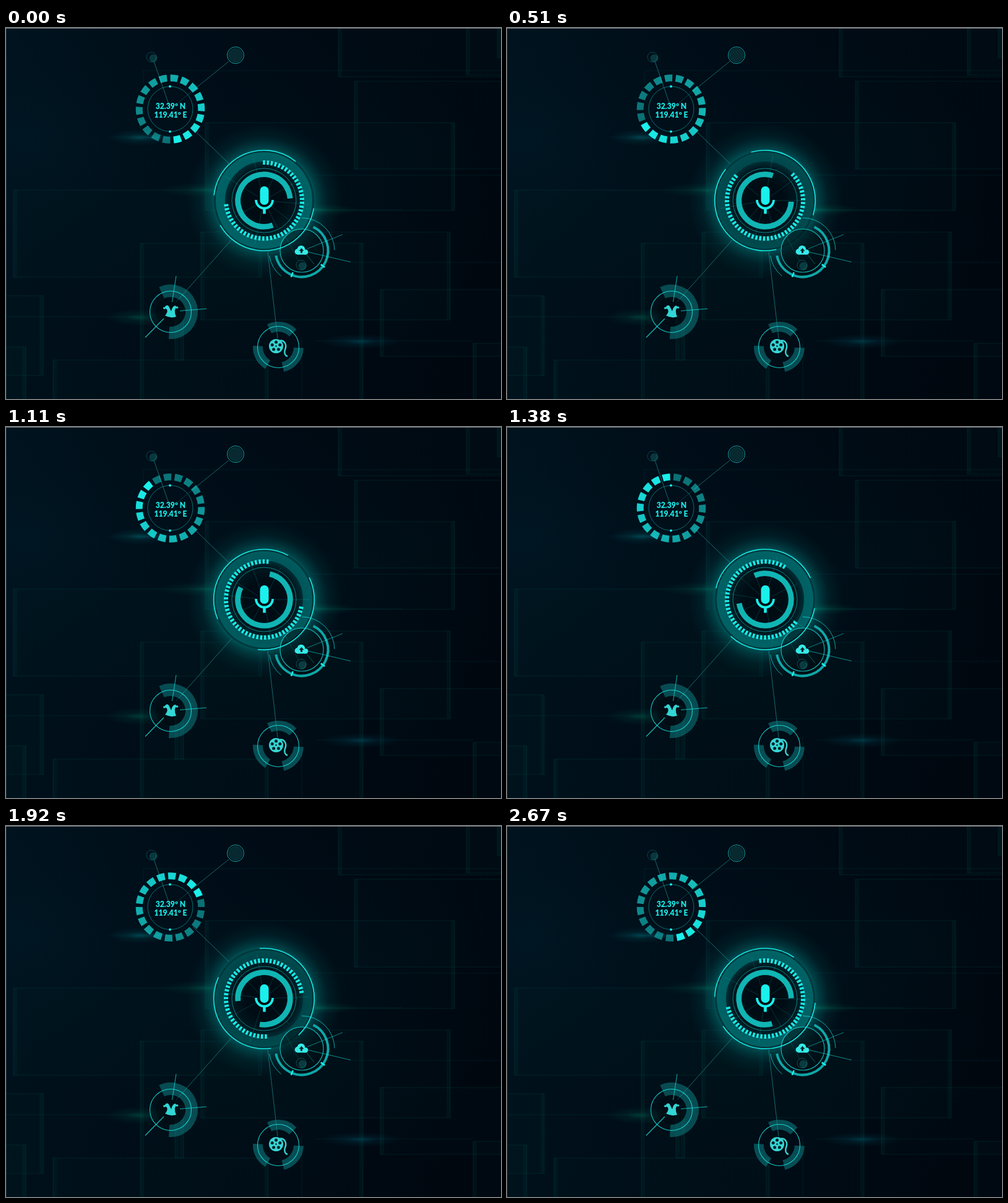
Animation of 800x600 px, one loop 2.7 s. Source, as an HTML page with a canvas:

```html
<!DOCTYPE html>
<html lang="en">
<head>
<meta charset="utf-8">
<title>Voice control HUD</title>
<style>
html, body { margin: 0; width: 100%; height: 100%; overflow: hidden; background: #000a13; }
canvas { display: block; width: 800px; height: 600px; }
</style>
</head>
<body>
<canvas id="stage" width="800" height="600"></canvas>
<script>
const LOOP = 2700, STEP = 30, TAU = Math.PI * 2;
const HUB = [417, 279], DIAL = [265.5, 131], CLOUD = [478, 360], HAT = [266, 459], REEL = [440, 516];
const stage = document.getElementById('stage').getContext('2d');
const backdrop = document.createElement('canvas');
backdrop.width = 800;
backdrop.height = 600;
let g = backdrop.getContext('2d');

const rad = deg => deg * Math.PI / 180;
const cyan = alpha => `rgba(26,240,236,${alpha})`;
const polar = ([x, y], r, deg) => [x + r * Math.cos(rad(deg)), y + r * Math.sin(rad(deg))];

function arc([x, y], r, from, to, width, color) {
  g.beginPath();
  g.arc(x, y, r, rad(from), rad(to));
  g.lineWidth = width;
  g.strokeStyle = color;
  g.stroke();
}

const ring = (center, r, width, color) => arc(center, r, 0, 360, width, color);

function disc([x, y], r, color) {
  g.beginPath();
  g.arc(x, y, r, 0, TAU);
  g.fillStyle = color;
  g.fill();
}

function line(x1, y1, x2, y2, color, width = 1) {
  g.beginPath();
  g.moveTo(x1, y1);
  g.lineTo(x2, y2);
  g.lineWidth = width;
  g.strokeStyle = color;
  g.stroke();
}

function spoke(center, r1, r2, deg, color, width) {
  line(...polar(center, r1, deg), ...polar(center, r2, deg), color, width);
}

function glow(x, y, rx, ry, rgb, alpha) {
  g.save();
  g.translate(x, y);
  g.scale(rx, ry);
  const fade = g.createRadialGradient(0, 0, 0, 0, 0, 1);
  fade.addColorStop(0, `rgba(${rgb},${alpha})`);
  fade.addColorStop(0.4, `rgba(${rgb},${alpha * 0.35})`);
  fade.addColorStop(1, `rgba(${rgb},0)`);
  g.fillStyle = fade;
  g.fillRect(-1, -1, 2, 2);
  g.restore();
}

function frame(x1, y1, x2, y2) {
  g.strokeStyle = 'rgba(0,105,100,.14)';
  g.lineWidth = 1.5;
  g.strokeRect(x1, y1, x2 - x1, y2 - y1);
  g.fillStyle = 'rgba(0,95,90,.1)';
  g.fillRect(x1, y1, 6, y2 - y1);
  g.fillRect(x2 - 6, y1, 6, y2 - y1);
  g.fillStyle = 'rgba(0,90,95,.025)';
  g.fillRect(x1, y1, x2 - x1, y2 - y1);
}

function drawBackdrop() {
  const base = g.createLinearGradient(0, 0, 800, 120);
  base.addColorStop(0, '#00121d');
  base.addColorStop(0.5, '#000b15');
  base.addColorStop(1, '#00070f');
  g.fillStyle = base;
  g.fillRect(0, 0, 800, 600);
  glow(40, 180, 330, 260, '0,34,50', 0.3);
  glow(430, 290, 380, 290, '0,40,52', 0.26);

  [[12, 262, 413, 403], [322, 153, 725, 295], [563, 86, 820, 228], [537, -9, 820, 79],
    [744, -9, 820, 76], [794, -9, 820, 48], [217, 348, 577, 620], [315, 330, 718, 472], [605, 423, 820, 531],
    [755, 510, 820, 620], [-9, 433, 60, 562], [-9, 516, 32, 620], [76, 537, 424, 620], [273, 452, 287, 537]
  ].forEach(box => frame(...box));
  [[222, 69, 800, 69], [222, 69, 222, 90], [495, 238, 800, 238], [560, 379, 800, 379],
    [0, 467, 215, 467], [500, 506, 755, 506], [500, 294, 640, 294], [478, 500, 478, 600]
  ].forEach(path => line(...path, 'rgba(0,110,110,.16)'));

  glow(215, 177, 48, 13, '0,100,105', 0.5);
  glow(235, 177, 80, 5, '0,95,115', 0.35);
  glow(322, 262, 75, 12, '0,105,85', 0.4);
  glow(215, 468, 55, 14, '0,110,85', 0.42);
  glow(573, 507, 65, 12, '0,85,105', 0.5);
  glow(500, 294, 70, 10, '0,125,90', 0.4);

  g.fillStyle = 'rgba(150,165,170,.75)';
  g.fillRect(0, 0, 800, 1);
  g.fillStyle = 'rgba(110,130,140,.25)';
  g.fillRect(0, 0, 1, 600);
}

function drawLinks() {
  const link = 'rgba(40,165,165,.58)';
  line(360, 54, 302, 101, link);
  line(302, 101, 277, 122, cyan(0.2));
  line(239, 54, 264, 126, link);
  line(302, 163, 360, 219, link);
  line(364, 343, 275, 443, link);
  line(423, 362, 439, 502, link);
  disc([371, 44], 11, '#07292f');
  ring([371, 44], 11, 0.6, cyan(0.25));
  ring([371, 44], 13.5, 1, cyan(0.65));
  disc([238, 49], 6.5, 'rgba(12,70,75,.75)');
  ring([235, 47], 8, 1, cyan(0.24));
}

function drawDial(turn) {
  for (let i = 0; i < 18; i++) {
    const mid = 77 + turn - i * 20;
    arc(DIAL, 50.3, mid - 6.9, mid + 6.9, 11, cyan(0.43 + 0.57 * Math.pow(1 - i / 17, 1.15)));
  }
  const [x, y] = DIAL;
  ring(DIAL, 36.5, 1, cyan(0.42));
  disc([x - 0.5, y - 36.5], 1.9, cyan(1));
  disc([x - 0.5, y + 36.5], 1.9, cyan(1));
  g.fillStyle = cyan(0.97);
  g.font = '900 12.2px Lato, sans-serif';
  g.textAlign = 'center';
  g.fillText('32.39° N', 266, 130.5);
  g.fillText('119.41° E', 266, 144.5);
}

function drawMic() {
  g.fillStyle = cyan(1);
  g.beginPath();
  g.roundRect(410.5, 256, 14, 30, 7);
  g.fill();
  arc([417.5, 278], 13.5, 0, 180, 3.8, cyan(1));
  g.fillRect(415.2, 291, 4.6, 9.5);
}

function drawHub(n) {
  const turn = n * 4;
  const pulse = 0.5 + 0.5 * Math.cos(n / 45 * TAU);
  const tickTurn = n < 65 ? n * 180 / 65 : 180 + (n - 65) * 7.2;

  const halo = g.createRadialGradient(...HUB, 76, ...HUB, 126);
  halo.addColorStop(0, 'rgba(0,150,148,.62)');
  halo.addColorStop(0.2, 'rgba(0,130,130,.4)');
  halo.addColorStop(0.55, 'rgba(0,105,108,.14)');
  halo.addColorStop(1, 'rgba(0,90,100,0)');
  disc(HUB, 126, halo);

  const body = g.createRadialGradient(...HUB, 30, ...HUB, 82);
  body.addColorStop(0, '#000c14');
  body.addColorStop(0.45, '#001820');
  body.addColorStop(0.65, '#003036');
  body.addColorStop(1, '#003a3e');
  disc(HUB, 81, body);
  ring(HUB, 70.5, 15, `rgba(0,155,155,${0.17 + 0.27 * pulse})`);

  disc(CLOUD, 35, 'rgba(0,14,21,.5)');
  [[5, 72], [38, 62], [64, 50], [102, 72], [150, 58], [212, 74], [256, 70], [292, 60], [330, 56]]
    .forEach(([deg, r]) => spoke(HUB, 12, r, deg + turn, cyan(0.16), 1));

  arc(HUB, 81.3, 186 + turn, 309 + turn, 1.6, cyan(0.95));
  arc(HUB, 81.3, 9 + turn, 150.6 + turn, 1.6, cyan(0.95));
  for (let i = 0; i < 46; i++) {
    spoke(HUB, 58, 65, -90 + tickTurn + i * 5.84, cyan(0.96), 3.6);
  }
  ring(HUB, 52, 1, cyan(0.5));
  arc(HUB, 42.3, 70.5 - turn, 355.5 - turn, 8.8, 'rgba(18,196,194,.92)');
  drawMic();
}

function drawCloud() {
  ring(CLOUD, 35, 1.1, cyan(0.75));
  arc(CLOUD, 42.5, -64, 169, 4, 'rgba(16,184,184,.9)');
  spoke(CLOUD, 38, 46, 36, cyan(1), 2.6);
  spoke(CLOUD, 38, 46, 112, cyan(1), 2.6);
  arc(CLOUD, 53, -90, -1, 1, cyan(0.65));
  arc(CLOUD, 53, 129, 171, 1, cyan(0.65));
  line(487, 357, 544, 334, cyan(0.5));
  line(487, 362, 557, 378.5, cyan(0.55));
  line(486, 367, 498, 382, cyan(0.35));
  line(452, 338, 473, 377, cyan(0.15));
  disc([479, 385], 6.5, 'rgba(12,70,75,.8)');
  ring([477, 383.5], 8, 1, cyan(0.28));

  const fill = '#35ebe8';
  disc([471.3, 361.8], 4.7, fill);
  disc([477, 358], 6.2, fill);
  disc([484, 362.4], 4.1, fill);
  g.fillRect(471, 360, 13, 6.5);
  g.fillStyle = '#02232a';
  g.beginPath();
  g.moveTo(477.5, 356);
  g.lineTo(481.5, 360.5);
  g.lineTo(473.5, 360.5);
  g.fill();
  g.fillRect(476, 360, 3, 3.8);
}

function drawHat() {
  disc(HAT, 24, 'rgba(0,10,16,.5)');
  arc(HAT, 34, 245, 454, 20, 'rgba(16,146,148,.46)');
  ring(HAT, 33.5, 1.1, cyan(0.82));
  line(275, 401, 268.5, 443, cyan(0.7));
  line(281, 457.5, 324, 454, cyan(0.7));
  line(225, 500.5, 255, 470, cyan(0.8), 1.1);

  const fill = '#32d6d4';
  g.fillStyle = fill;
  g.beginPath();
  g.moveTo(257, 465);
  g.quadraticCurveTo(262, 460, 260, 455);
  g.lineTo(256, 453);
  g.quadraticCurveTo(259, 446, 263, 450);
  g.lineTo(267, 458);
  g.quadraticCurveTo(269, 449, 274, 449);
  g.lineTo(276, 452);
  g.quadraticCurveTo(270, 455, 275, 467);
  g.quadraticCurveTo(266, 470, 257, 465);
  g.fill();
  disc([255.8, 453], 1.8, fill);
  disc([276.5, 452], 1.8, fill);
}

function drawReel() {
  [[244, 316], [2, 77], [121, 183]].forEach(([from, to]) => arc(REEL, 33, from, to, 16, 'rgba(16,146,148,.48)'));
  ring(REEL, 33.5, 1.1, cyan(0.82));

  const fill = '#36d4d2', hub = [436.5, 514.5];
  disc(hub, 11.5, fill);
  for (let i = 0; i < 5; i++) disc(polar(hub, 6.6, -90 + i * 72), 2.5, '#04202a');
  disc(hub, 1.3, '#04202a');
  g.beginPath();
  g.moveTo(443, 505.5);
  g.bezierCurveTo(451, 505, 454, 513, 451, 520);
  g.bezierCurveTo(449, 526, 451, 530, 455, 531);
  g.lineWidth = 2.4;
  g.strokeStyle = fill;
  g.stroke();
}

function render(now) {
  const n = Math.floor((now % LOOP) / STEP);
  g.drawImage(backdrop, 0, 0);
  drawHub(n);
  drawLinks();
  drawDial(n * 4);
  drawCloud();
  drawHat();
  drawReel();
}

drawBackdrop();
g = stage;
const start = performance.now();
function tick() {
  render(performance.now() - start);
  requestAnimationFrame(tick);
}
tick();
</script>
</body>
</html>
```
